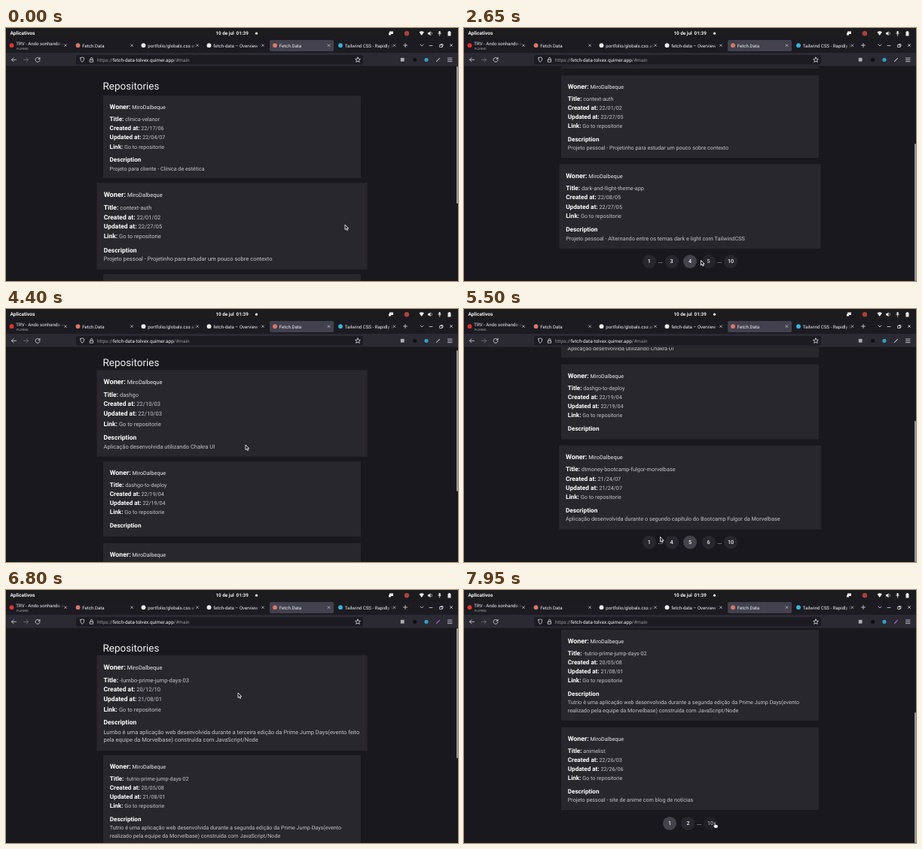
An HTML page for the animation above (8 s loop, 600 by 337 pixels).

```html
<!DOCTYPE html>
<html lang="pt-BR">
<head>
<meta charset="utf-8">
<title>Repositories</title>
<style>
html, body { margin: 0; width: 100%; height: 100%; overflow: hidden; background: #19181d; }
#stage { position: relative; width: 600px; height: 337px; overflow: hidden; background: #19181d;
  font-family: Roboto, "Noto Sans", sans-serif; text-rendering: geometricPrecision; white-space: pre; }
#bar, #mouse { position: absolute; left: 0; top: 0; }
#view { position: absolute; left: 0; top: 50.5px; width: 600px; height: 286.5px; overflow: hidden; }
.doc { position: absolute; left: 0; top: -50.5px; width: 600px; height: 600px; }
h1 { position: absolute; margin: 0; left: 128.5px; top: 67.5px; font-size: 13.5px; line-height: 20px;
  font-weight: 400; color: #f2f2f3; }
.card { position: absolute; left: 128.8px; width: 342.2px; background: #28272c; }
.line { position: absolute; left: 8.8px; font-size: 7.2px; line-height: 12px; color: #c6c5c9; }
.line b { font-size: 8.1px; font-weight: 600; color: #fff; }
.line.own { color: #ebebed; }
.line.own b { font-size: 8.8px; }
.num { position: absolute; width: 18px; height: 18px; border-radius: 50%; background: #28272c; color: #f4f4f5;
  font-size: 7.2px; font-weight: 500; line-height: 18px; text-align: center; }
.num.on { background: #44434b; }
.num.gap { background: none; }
#thumb { position: absolute; left: 598.2px; width: 1.8px; background: #97969b; border-radius: 1px; }
</style>
</head>
<body>
<div id="stage">
  <div id="view"></div>
  <div id="thumb"></div>
  <svg id="bar" width="600" height="51" viewBox="0 0 600 51" fill="none" stroke-linecap="round" stroke-linejoin="round">
    <defs>
      <linearGradient id="fade"><stop stop-color="#1c1b22" stop-opacity="0"/><stop offset="1" stop-color="#1c1b22"/></linearGradient>
    </defs>
    <path fill="#1c1b1e" d="M0 0h600v14.5H0z"/>
    <path fill="#1c1b22" d="M0 14.5h600V33H0z"/>
    <path fill="#2b2a33" d="M0 33h600v17.5H0z"/>
    <rect x="350" y="16" width="85" height="15" rx="2" fill="#42414d"/>
    <rect x="93" y="36" width="381" height="12.6" rx="2" fill="#1c1b22"/>
    <g fill="#f1f1f2" font-size="6.3" font-weight="700">
      <text x="5.5" y="9.4" font-size="6.6">Aplicativos</text>
      <text x="278.5" y="9.4">10 de jul</text>
      <text x="321.8" y="9.4" text-anchor="end">01:39</text>
      <circle cx="332.5" cy="7.2" r="1.6"/>
    </g>
    <g fill="#ececee">
      <path d="M509 4.5h5v3.500h-3v1.500h-3v-3h1z"/>
      <path d="M548.5 5.6q3.2-2.6 6.4 0L551.7 10z"/>
      <path d="M560 6h1.500l2-1.800v6l-2-1.800H560z"/>
      <rect x="574.500" y="4" width="2.200" height="4" rx="1.100"/>
      <path d="M586.500 5h1V4h2v1h1v5.500h-4z"/>
    </g>
    <path stroke="#ececee" stroke-width=".6" d="M565 5.600q1.300 1.600 0 3.200M573.500 7q2 3.500 4.200 0M575.600 9v1.500"/>
    <circle cx="532" cy="7.2" r="3.2" fill="#a8433c"/>
    <g id="tabs"></g>
    <g stroke="#dedee2" stroke-width=".8">
      <path d="M527.5 23h5M530 20.5v5M550 22l2 2 2-2M562 23.5h4M576 22.5h3v3h-3zM577 22.5v-1h3v3h-1M589.5 21.5l3 3m0-3l-3 3"/>
      <path d="M13.5 42.3h-6m2.6-2.6l-2.6 2.6 2.6 2.6"/>
      <path stroke="#77767d" d="M23.5 42.3h6m-2.6-2.6l2.6 2.6-2.6 2.6"/>
      <path d="M44.8 41a3 3 0 1 0 .2 2M45 39.3v2h-2"/>
      <path d="M98.7 39.8l2.5-1 2.5 1q.2 4-2.5 5.7-2.7-1.7-2.5-5.7z"/>
      <path d="M111.6 42.2h4v3h-4zM112.3 42v-1.3a1.3 1.3 0 0 1 2.6 0V42"/>
      <path d="M467 39l1 2.2 2.4.2-1.8 1.6.6 2.4-2.2-1.3-2.2 1.3.6-2.4-1.8-1.6 2.4-.2z"/>
      <path d="M586.5 40h5.5M586.5 42.3h5.5M586.5 44.6h5.5"/>
    </g>
    <rect x="523.8" y="39.8" width="4.8" height="4.8" fill="#aeadb4"/>
    <circle cx="542.7" cy="42.3" r="2.6" fill="#101014"/>
    <circle cx="558" cy="42.3" r="2.6" fill="#2f9fc4"/>
    <path id="pen" stroke-width="1.2" d="M571.5 44.3l4-4"/>
    <text x="121" y="44.6" font-size="6.4" fill="#98979e">https://<tspan fill="#f3f3f5">fetch-data-tolvex.quimer.app</tspan>/#main</text>
  </svg>
  <svg id="mouse" width="12" height="14" viewBox="-3 -1 12 14">
    <path id="arrow" fill="#18181a" stroke="#fff" stroke-width=".8" d="M0 0v6.600l1.500-1.400 1.100 2.400 1.100-.5-1.100-2.300h2.100z"/>
    <path id="hand" fill="#fff" stroke="#222" stroke-width=".4" d="M-.7 0q.7-.7 1.300 0v3l3 .8q.6.300.4 1.200l-.6 2.600H0l-2.200-3q.5-1 1.500 0z"/>
  </svg>
</div>
<script>
const $ = id => document.getElementById(id);
const LOOP = 8000, TOP = 90.2, GAP = 8.8;
const OWNER = 'MiroDalbeque';

// Repository: title, created, updated, description lines
const pages = [
  { nums: ['1', '...', '3', '4', '5', '...', '10'], on: '4',
    repos: [
      ['clinica-velanor', '22/17/06', '22/04/07', 'Projeto para cliente - Clínica de estética'],
      ['context-auth', '22/01/02', '22/27/05', 'Projeto pessoal - Projetinho para estudar um pouco sobre contexto'],
      ['dark-and-llight-theme-app', '22/08/05', '22/27/05', 'Projeto pessoal - Alternando entre os temas dark e light com TailwindCSS']] },
  { nums: ['1', '...', '4', '5', '6', '...', '10'], on: '5',
    repos: [
      ['dashgo', '22/10/03', '22/10/03', 'Aplicação desenvolvida utilizando Chakra UI'],
      ['dashgo-to-deploy', '22/19/04', '22/19/04'],
      ['dtmoney-bootcamp-fulgor-morvelbase', '21/24/07', '21/24/07', 'Aplicação desenvolvida durante o segundo capítulo do Bootcamp Fulgor da Morvelbase']] },
  { nums: ['1', '2', '...', '10'], on: '1',
    repos: [
      ['-lumbo-prime-jump-days-03', '20/12/10', '21/08/01', 'Lumbo é uma aplicação web desenvolvida durante a terceira edição da Prime Jump Days(evento feito', 'pela equipe da Morvelbase) construída com JavaScript/Node'],
      ['-tutrio-prime-jump-days-02', '20/05/08', '21/08/01', 'Tutrio é uma aplicação web desenvolvida durante a segunda edição da Prime Jump Days(evento', 'realizado pela equipe da Morvelbase) construída com JavaScript/Node'],
      ['animelist', '22/26/03', '22/26/06', 'Projeto pessoal - site de anime com blog de notícias']] }
];
// Scrolls alternate down and up; each one up opens the next page
const scrolls = [1153, 3200, 4392, 5950, 6820];
// Pointer moves: start, end, x, y
const moves = [
  [0, 1, 450, 262], [250, 850, 373, 108], [2000, 2560, 314.5, 309.5], [2900, 3050, 320, 309], [3350, 3800, 318, 181],
  [5030, 5380, 260.5, 303.5], [5600, 5800, 247, 309], [6150, 6700, 308, 137], [7500, 7740, 333, 309.5]];

const clamp = p => Math.max(0, Math.min(1, p));
const smooth = p => p * p * (3 - 2 * p);
const passed = t => scrolls.filter(s => s <= t).length;

// Share of the page scrolled, 0 at the top and 1 at the end
function depth(t) {
  const n = passed(t);
  if (!n) return 0;
  const rest = (1 - clamp((t - scrolls[n - 1]) / 300)) ** 1.5;
  return n % 2 ? 1 - rest : rest;
}

function pointer(t) {
  let [, , x, y] = moves[0];
  for (const [from, to, nx, ny] of moves) {
    const p = smooth(clamp((t - from) / (to - from)));
    x += (nx - x) * p;
    y += (ny - y) * p;
  }
  return { x, y };
}

function onCard(page, card, t) {
  const { x, y } = pointer(t), py = y + depth(t) * page.max;
  return Math.abs(x - 300) < 171 && py > card.y && py < card.y + card.height;
}

function onDot(page, dot, t, reach) {
  const { x, y } = pointer(t);
  return !dot.gap && Math.hypot(x - dot.x, y + depth(t) * page.max - dot.y) < reach;
}

// A 200 ms transition: the share of that time spent under the pointer
function hover(t, test) {
  let sum = 0;
  for (let i = 0; i < 20; i++) sum += test(Math.max(0, t - 60 - 10 * i));
  return sum / 20;
}

function add(parent, cls, text = '', css = {}) {
  const el = document.createElement('div');
  el.className = cls;
  el.textContent = text;
  for (const k in css) el.style[k] = css[k] + 'px';
  parent.append(el);
  return el;
}

function line(card, y, label, text, cls = '') {
  const el = add(card, 'line ' + cls, '', { top: y - 6 });
  if (label) {
    const b = document.createElement('b');
    b.textContent = label;
    el.append(b, ' ');
  }
  el.append(text);
}

function build(page) {
  const doc = page.doc = add($('view'), 'doc');
  const h = document.createElement('h1');
  h.textContent = 'Repositories';
  doc.append(h);
  let y = TOP;
  page.cards = page.repos.map(([title, made, edited, ...text]) => {
    const height = 99.7 + 10.6 * text.length;
    const el = add(doc, 'card', '', { top: y, height });
    line(el, 16, 'Woner:', OWNER, 'own');
    const facts = { 'Title:': title, 'Created at:': made, 'Updated at:': edited, 'Link:': 'Go to repositorie' };
    Object.keys(facts).forEach((k, i) => line(el, 30.8 + 12.2 * i, k, facts[k]));
    line(el, 85.1, 'Description', '');
    text.forEach((s, i) => line(el, 97.4 + 10.6 * i, '', s));
    const card = { el, y, height };
    y += height + GAP;
    return card;
  });
  let x = 0;
  page.dots = page.nums.map((s, i) => {
    const gap = s === '...';
    if (i) x += gap || page.nums[i - 1] === '...' ? 14.8 : 24.5;
    return { s, gap, x, y: y + 9 };
  });
  for (const d of page.dots) {
    d.x += 300 - x / 2;
    d.el = add(doc, 'num' + (d.gap ? ' gap' : d.s === page.on ? ' on' : ''), d.s, { left: d.x - 9, top: y });
  }
  page.max = y - 301.6;
}

function tabs() {
  const list = [
    [7.5, '#e3322d', 'TRV - Ando sonhando a'], [95.5, '#d9776a', 'Fetch.Data'],
    [182.5, '#eeeeef', 'portfolio/globals.css at'], [269.5, '#eeeeef', 'fetch-data – Overview –'],
    [357, '#d9776a', 'Fetch.Data'], [444, '#35b5d8', 'Tailwind CSS - Rapidly b']];
  $('tabs').innerHTML = list.map(([x, c, s], i) => {
    const end = x + 71.5;
    const fade = `<path fill="url(#fade)" d="M${end - 11} 17h9v13h-9z"/><path fill="#1c1b22" d="M${end - 2} 17h8v13h-8z"/>`;
    return `<circle cx="${x}" cy="23.2" r="2.9" fill="${c}"/>
      <text x="${x + 5.8}" y="${i ? 25.6 : 22.8}" font-size="6.1" fill="#f0f0f2">${s}</text>
      ${s.length > 12 ? fade : ''}
      <path stroke="#d4d4d8" stroke-width=".7" d="M${end - 1.4} 21.8l2.8 2.8m0-2.8l-2.8 2.8"/>`;
  }).join('') + '<text x="14" y="28.6" font-size="3.9" fill="#b5b4ba">PLAYING</text>';
}

function render(t) {
  const page = pages[passed(t) >> 1], d = depth(t);
  for (const p of pages) p.doc.style.display = p === page ? '' : 'none';
  page.doc.style.transform = `translateY(${-d * page.max}px)`;
  for (const c of page.cards)
    c.el.style.transform = `scale(${1 + .05 * hover(t, u => onCard(page, c, u))})`;
  for (const o of page.dots)
    o.el.style.opacity = 1 - .4 * hover(t, u => onDot(page, o, u, 10.5));

  const size = 286.5 * 258 / (258 + page.max);
  $('thumb').style.height = size + 'px';
  $('thumb').style.top = 50.5 + (286.5 - size) * d + 'px';

  const { x, y } = pointer(t);
  const hand = page.dots.some(o => onDot(page, o, t, 9));
  $('hand').style.display = hand ? '' : 'none';
  $('arrow').style.display = hand ? 'none' : '';
  $('mouse').style.transform = `translate(${x - 3}px, ${y - 1}px)`;
  $('pen').setAttribute('stroke', page === pages[2] ? '#a56be0' : '#b4b3b9');
}

pages.forEach(build);
tabs();
const start = performance.now();
function tick() {
  render((performance.now() - start) % LOOP);
  requestAnimationFrame(tick);
}
tick();
</script>
</body>
</html>
```
